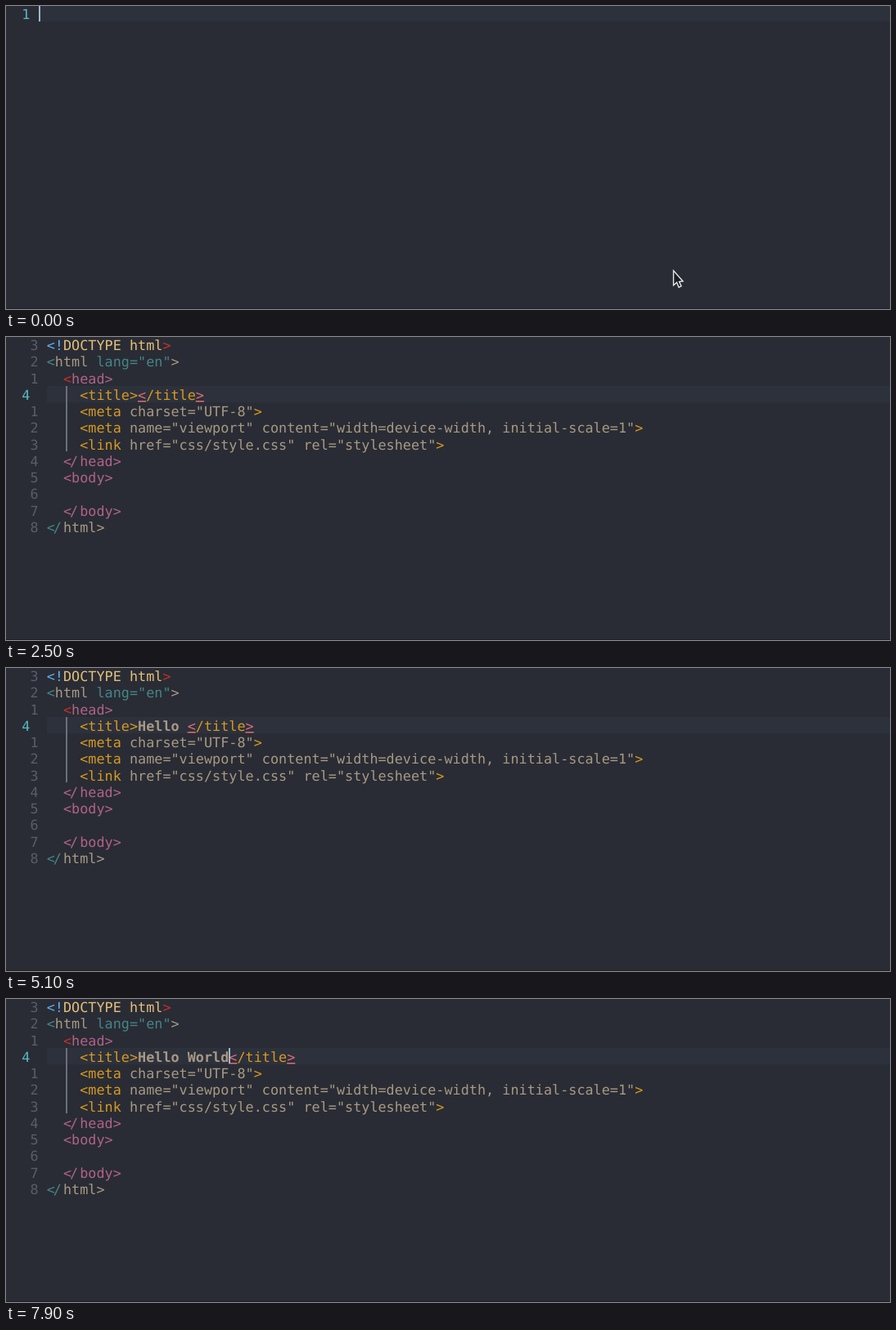
An HTML page with a canvas that plays this animation: 1080x371 px, repeating every 8 s.

```html
<!DOCTYPE html>
<html lang="en">
<head>
<meta charset="UTF-8">
<title>Snippet completion</title>
<style>
html, body { margin: 0; width: 100%; height: 100%; overflow: hidden; background: #292c34; }
canvas { display: block; width: 1080px; height: 371px; }
</style>
</head>
<body>
<canvas id="stage" width="1080" height="371"></canvas>
<script>
const ctx = document.getElementById('stage').getContext('2d');
ctx.textRendering = 'geometricPrecision';
const LOOP = 8000, CELL = 10.12, ROW = 20.25;
const FONT = '16.8px "DejaVu Sans Mono", "Noto Sans Mono", monospace';
const BG = '#292c34', PANEL = '#21252b', ACCENT = '#61afef';

// Each run of text starts with one of these colour keys.
const COLORS = {
  w: '#abb2bf', b: '#61afef', o: '#d19a66', s: '#bdb68a', c: '#6b717d',
  y: '#e5c07b', r: '#c4302b', t: '#458588', n: '#a89984', N: '#a89984',
  p: '#b16286', g: '#d79921', u: '#e06c75', l: '#585d68', L: '#56b6c2', D: '#252a33'
};
const BOLD = 'ND', ITALIC = 'c', UNDERLINED = 'u';

const DOC = [
  [29, 'c<!DOCTYPE html>'],
  [29, 'w<|bhtml|w |olang|w=|s"en"|w>'],
  [36, 'w<|bhead|w>'],
  [44, 'w<|btitle|w></|btitle|w>'],
  [44, 'w<|bmeta|w |ocharset|w=|s"UTF-8"|w>'],
  [44, 'w<|bmeta|w |oname|w=|s"viewport"'],
  [46, 'ocontent|w=|s"width=device-width, initial-'],
  [46, 'sscale=1"|w>'],
  [44, 'w<|blink|w |ohref|w=|s"css/style.css"'],
  [46, 'orel|w=|s"stylesheet"|w>'],
  [36, 'w</|bhead|w>'],
  [36, 'w<|bbody|w>']
];

const PAGE = [
  [5, 'b<!|yDOCTYPE html|r>'],
  [5, 't<|nhtml |tlang="en"|n>'],
  [7, 'r<|phead>'],
  null,
  [9, 'g<meta|n charset="UTF-8"|g>'],
  [9, 'g<meta|n name="viewport" content="width=device-width, initial-scale=1"|g>'],
  [9, 'g<link|n href="css/style.css" rel="stylesheet"|g>'],
  [7, 'p</head>'],
  [7, 'p<body>'],
  null,
  [7, 'p</body>'],
  [5, 't</|nhtml>']
];

// Keystrokes: time, text on the current line, selected popup entry.
const EXPAND = 2000;
const KEYS = [
  [-100, ''], [700, 'h'], [800, 'ht', 'html5'], [1000, 'htm', 'html5'],
  [1100, 'html', 'html'], [1500, 'html5', 'html5'],
  [EXPAND, ''], [3300, 'H'], [3500, 'He', 'He'], [3700, 'Hel', 'Hel'],
  [3900, 'Hell', 'Hell'], [4100, 'Hello', 'Hello'], [4400, 'Hello '],
  [5700, 'Hello W'], [5900, 'Hello Wo'], [6200, 'Hello Wor'],
  [6400, 'Hello Worl'], [6800, 'Hello World']
];

const colX = col => col * CELL - 0.9;
const rowY = row => Math.max(0, Math.round(row * ROW - 0.8));

function cells(col, row, cols, rows, color) {
  const x = Math.round(colX(col)), y = rowY(row);
  ctx.fillStyle = color;
  ctx.fillRect(x, y, Math.round(colX(col + cols)) - x, rowY(row + rows) - y);
}

function put(col, row, markup) {
  const base = row * ROW + 16.2;
  for (const run of markup.split('|')) {
    const key = run[0], text = run.slice(1);
    ctx.fillStyle = COLORS[key];
    ctx.font = (ITALIC.includes(key) ? 'italic ' : '') + (BOLD.includes(key) ? 'bold ' : '') + FONT;
    [...text].forEach((ch, i) => {
      const joined = ch === '/' && text[i - 1] === '<';
      ctx.fillText(ch, colX(col + i) - (joined ? 2 : 0), base);
    });
    if (UNDERLINED.includes(key)) ctx.fillRect(colX(col), Math.round(base) + 1, CELL * text.length, 1.5);
    col += text.length;
  }
}

function line(...points) {
  ctx.beginPath();
  points.forEach(([x, y]) => ctx.lineTo(x, y));
  ctx.stroke();
}

const ICONS = {
  scissors() {
    line([5, -3], [17, 4]);
    line([5, 3], [17, -4]);
    for (const y of [-4, 4]) {
      ctx.beginPath();
      ctx.arc(3, y, 2.2, 0, 7);
      ctx.stroke();
    }
  },
  arrow() {
    line([1.5, -5], [1.5, 2], [10, 2]);
    line([7, -1], [10.5, 2], [7, 5]);
  },
  clipboard(back) {
    ctx.fillRect(0.5, -5, 12, 12);
    ctx.fillRect(4, -7, 5, 3);
    ctx.fillStyle = back;
    ctx.fillRect(5.7, -5.3, 1.6, 1.6);
    [-2, 0.5, 3].forEach((y, i) => ctx.fillRect(3, y, i < 2 ? 7 : 5, 1.2));
  }
};

function icon(name, col, row, color, back) {
  ctx.save();
  ctx.translate(colX(col), row * ROW + 10.5);
  ctx.strokeStyle = ctx.fillStyle = color;
  ctx.lineWidth = 1.5;
  ICONS[name](back);
  ctx.restore();
}

function menu(col, row, width, iconCol, items, selected) {
  items.forEach(([word, glyph, kind, tag], i) => {
    const on = word === selected, key = on ? 'D' : 'w', r = row + i;
    const back = on ? ACCENT : PANEL;
    cells(col, r, width, 1, back);
    put(col + 1, r, key + word);
    icon(glyph, iconCol, r, COLORS[key], back);
    put(iconCol + 3, r, key + kind);
    put(col + width - 4, r, key + tag);
  });
}

function pagePopup(word) {
  const items = [[word, 'arrow', '(Snippet)', '[L]']];
  if (word === 'He') {
    items.push(['head', 'scissors', '(Snippet)', '[S]'],
      ['header', 'scissors', '(Snippet)', '[S]'],
      ['href', 'clipboard', '(Buffer)', '[B]']);
  }
  menu(15, 4, 26, 24, items, word);
  cells(41, 4, 13 + 2 * word.length, 3, PANEL);
  put(42, 4, 'w' + word);
  put(42, 6, `w<|b${word}|w> \${1} </|b${word}|w>`);
}

function startPopup(text, selected) {
  const names = text.startsWith('html') ? ['html', 'html5'] : ['html5', 'html'];
  menu(3, 1, 25, 11, names.map(n => [n, 'scissors', '(Snippet)', '[S]']), selected);
  cells(28, 1, 55, 13, PANEL);
  DOC.forEach(([col, markup], i) => put(col, i + 1, markup));
}

function pointer() {
  ctx.beginPath();
  [[815.5, 324], [815.5, 342], [819.5, 338.5], [822, 344.5], [825, 343], [822.5, 337.5], [827, 337]]
    .forEach(([x, y]) => ctx.lineTo(x, y));
  ctx.closePath();
  ctx.fillStyle = '#1c1e24';
  ctx.fill();
  ctx.strokeStyle = '#e4e5e8';
  ctx.lineWidth = 1.4;
  ctx.stroke();
}

function drawPage(text, selected) {
  ctx.fillStyle = '#6a6f79';
  ctx.fillRect(73, 60, 2, 80);
  PAGE.forEach((entry, i) => {
    put(i === 3 ? 2 : 3, i, i === 3 ? 'L4' : 'l' + Math.abs(i - 3));
    if (entry) put(entry[0], i, entry[1]);
  });
  put(9, 3, `g<title>|N${text}|` + (selected ? 'g</title>' : 'u<|g/title|u>'));
  if (selected) pagePopup(selected);
}

function draw(t) {
  const [since, text, selected] = KEYS.filter(key => key[0] <= t).pop();
  const expanded = t >= EXPAND, row = expanded ? 3 : 0, col = expanded ? 5 : 4;
  ctx.fillStyle = BG;
  ctx.fillRect(0, 0, 1080, 371);
  cells(col, row, 110, 1, '#2d313c');
  if (expanded) {
    drawPage(text, selected);
  } else {
    put(2, 0, 'L1');
    put(4, 0, 'w' + text);
    if (selected) startPopup(text, selected);
    pointer();
  }
  if ((t - since) % 800 < 400) {
    ctx.fillStyle = '#a3b5c9';
    ctx.fillRect(Math.round(colX((expanded ? 16 : 4) + text.length)), rowY(row), 2, 19);
  }
  ctx.fillStyle = '#1f1f28';
  ctx.fillRect(0, 370, 1080, 1);
}

const start = performance.now();
function tick() {
  draw((performance.now() - start) % LOOP);
  requestAnimationFrame(tick);
}
tick();
</script>
</body>
</html>
```
